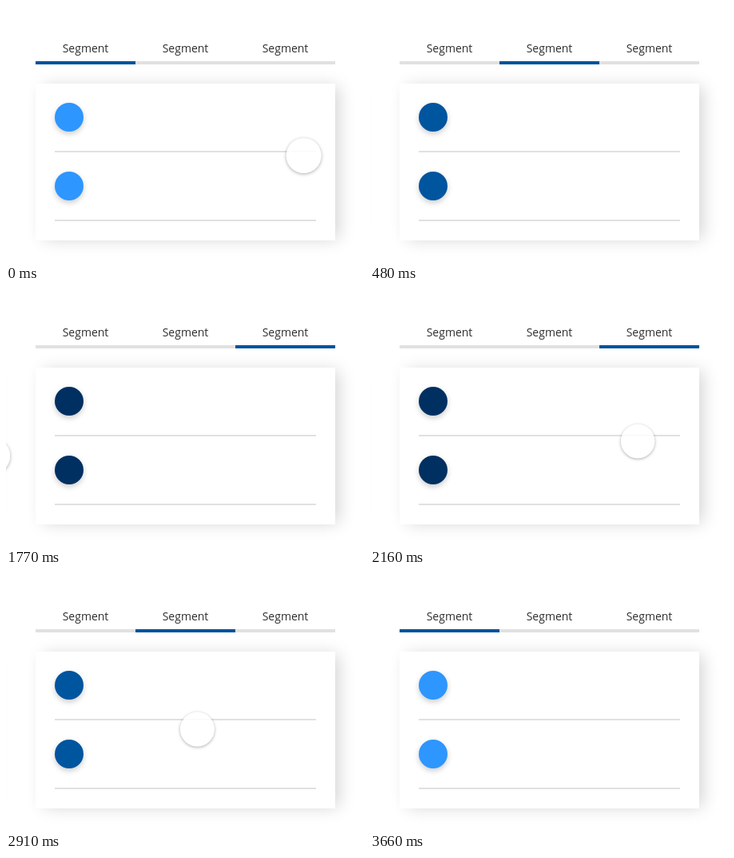
Animation of 448 by 320 pixels, one loop 3840 ms. Source, as an HTML page:

```html
<!DOCTYPE html>
<html lang="en">
<head>
<meta charset="utf-8">
<title>Segmented swipe</title>
<style>
  html, body { margin: 0; width: 100%; height: 100%; overflow: hidden; background: #fff; }
  .stage { position: relative; width: 448px; height: 320px; overflow: hidden; background: #fff; }
  .stage div { position: absolute; }
  .tabs { left: 37px; top: 43px; width: 375px; height: 30px; }
  .tabs span {
    position: absolute; top: 0; width: 125px; text-align: center;
    font: 14px/20px "Open Sans", sans-serif; color: #2e2e2e;
  }
  .tabs span:nth-child(2) { left: 125px; }
  .tabs span:nth-child(3) { left: 250px; }
  .rail { left: 0; top: 26px; width: 375px; height: 4px; background: #e1e1e1; }
  .bar { left: 0; top: 0; width: 125px; height: 4px; background: #00539c; }
  .track { left: 37px; top: 97px; }
  .card {
    top: 0; width: 375px; height: 196px; background: #fff;
    box-shadow: 7px 1px 20px -3px rgba(0, 0, 0, .18);
  }
  .dot {
    left: 24px; width: 36px; height: 36px; border-radius: 50%;
    background: var(--tint); box-shadow: 0 3px 7px rgba(0, 0, 0, .2);
  }
  .line { left: 24px; width: 327px; height: 2px; background: #e1e1e1; }
  .touch {
    left: -21.5px; top: -21.5px; width: 43px; height: 43px; border-radius: 50%;
    background: rgba(255, 255, 255, .86); box-shadow: 0 1px 4px rgba(0, 0, 0, .34);
  }
</style>
</head>
<body>
<div class="stage">
  <div class="tabs">
    <span>Segment</span><span>Segment</span><span>Segment</span>
    <div class="rail"><div class="bar"></div></div>
  </div>
  <div class="track"></div>
  <div class="touch"></div>
</div>
<script>
  const LOOP = 3840, TICK = 30, PAGE = 435, TAB = 125, SLIDE = 170;
  const $ = s => document.querySelector(s);
  const track = $('.track'), bar = $('.bar'), touch = $('.touch');

  track.innerHTML = ['#2e96ff', '#00559f', '#003061'].map((tint, i) => `
    <div class="card" style="left:${i * PAGE}px;--tint:${tint}">` +
      [24, 110].map(y => `
      <div class="dot" style="top:${y}px"></div>
      <div class="line" style="top:${y + 60}px"></div>`).join('') + `
    </div>`).join('');

  // The finger crosses the stage; the page slides after `delay`.
  const next = { step: 1, from: [468.5, 183], to: [-23, 201], time: 520, delay: 366 };
  const back = { step: -1, from: [-17.5, 207], to: [470, 181.5], time: 540, delay: 488 };
  const swipes = [[-102, next], [570, next], [1770, back], [2626, back]];

  const clamp = v => Math.min(1, Math.max(0, v));
  const lerp = (a, b, u) => a + (b - a) * u;
  const ease = u => u < .5 ? 4 * u ** 3 : 1 - 4 * (1 - u) ** 3;

  function draw(t) {
    let page = 0, finger = '';
    for (const [start, s] of swipes) {
      const age = t - start, u = age / s.time;
      page += s.step * ease(clamp((age - s.delay) / SLIDE));
      if (u >= 0 && u < 1) {
        const [x, y] = s.from.map((a, i) => lerp(a, s.to[i], u));
        finger = `translate(${x}px, ${y}px) scale(${1.03 - .06 * u})`;
      }
    }
    track.style.transform = `translateX(${-page * PAGE}px)`;
    bar.style.transform = `translateX(${page * TAB}px)`;
    touch.style.transform = finger;
    touch.style.visibility = finger ? 'visible' : 'hidden';
  }

  const begin = performance.now();
  function frame() {
    // Motion advances in whole ticks, with slack for timer jitter.
    const t = Math.floor((performance.now() - begin + 8) / TICK) * TICK;
    draw(t % LOOP);
    requestAnimationFrame(frame);
  }
  frame();
</script>
</body>
</html>
```
